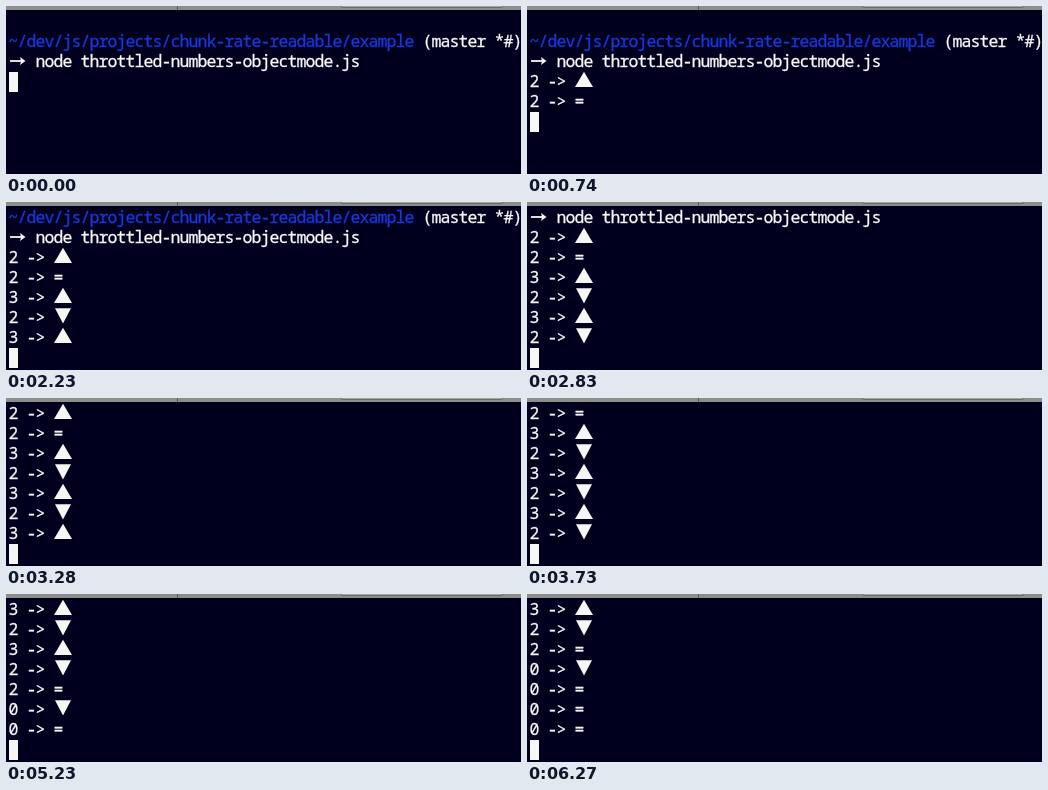
An HTML page that plays this animation: 515x168 px, repeating every 6590 ms.

```html
<!DOCTYPE html>
<html lang="en">
<head>
<meta charset="utf-8">
<title>Terminal</title>
<style>
  html, body { margin: 0; width: 100%; height: 100%; overflow: hidden; background: #00001e; }
  svg { display: block; width: 515px; height: 168px; }
  text {
    font: 500 16.5px "Noto Sans Mono", "DejaVu Sans Mono", monospace;
    letter-spacing: -.9px; white-space: pre;
    fill: #f8f8f8; stroke: #f8f8f8; stroke-width: .3;
  }
  .path { fill: #1638dc; stroke: #1638dc; }
  .shape { fill: #f6f6f4; }
</style>
</head>
<body>
<svg viewBox="0 0 515 168">
  <rect width="515" height="168" fill="#00001e"/>
  <g id="screen"></g>
  <rect id="cursor" class="shape" x="3" width="9" height="20"/>
  <rect width="515" height="4" fill="#8c8e8c"/>
  <rect x="171" width="1" height="4" fill="#5c5e5c"/>
  <rect x="335" y="-4" width="162" height="5.5" rx="2" fill="#a4a6a4" stroke="#6a6c6a"/>
</svg>
<script>
const LOOP = 6590, ROW = 20, COL = 9, LEFT = 3, TOP = 6, VISIBLE = 8;
const screen = document.getElementById("screen");
const cursor = document.getElementById("cursor");

// Each output line: time it is printed, value, trend.
const output = [
  [300, 2, "up"], [740, 2, "same"], [1190, 3, "up"], [1790, 2, "down"],
  [2230, 3, "up"], [2830, 2, "down"], [3280, 3, "up"], [3730, 2, "down"],
  [4330, 2, "same"], [4780, 0, "down"], [5230, 0, "same"], [5830, 0, "same"],
  [6270, 0, "same"]
];

const text = (col, str, cls = "") =>
  `<text x="${LEFT - .4 + col * COL}" y="15" class="${cls}">${str}</text>`;
const trends = {
  up: '<path class="shape" d="M48 15H66L57 -.3Z"/>',
  down: '<path class="shape" d="M49 .2H65L57 15.6Z"/>',
  same: text(5, "=")
};
const arrow = '<path d="M4 9H16" stroke="#f8f8f8" stroke-width="1.8"/>' +
  '<path class="shape" d="M14 5L19.5 9L14 13L15 9Z"/>';

const header = [
  "",
  text(0, "~/dev/js/projects/chunk-rate-readable/example", "path") + text(46, "(master *#)"),
  arrow + text(3, "node throttled-numbers-objectmode.js")
];
const lines = header.concat(
  output.map(([, value, trend]) => text(0, `${value} -&gt;`) + trends[trend])
);

let shown = -1;
function draw(time) {
  const count = header.length + output.filter(([at]) => at <= time).length;
  if (count === shown) return;
  shown = count;
  const first = Math.max(0, count + 1 - VISIBLE);
  screen.innerHTML = lines.slice(first, count)
    .map((line, i) => `<g transform="translate(0 ${TOP + i * ROW})">${line}</g>`)
    .join("");
  cursor.setAttribute("y", TOP + (count - first) * ROW);
}

const start = performance.now();
function tick() {
  draw((performance.now() - start) % LOOP);
  requestAnimationFrame(tick);
}
tick();
</script>
</body>
</html>
```
